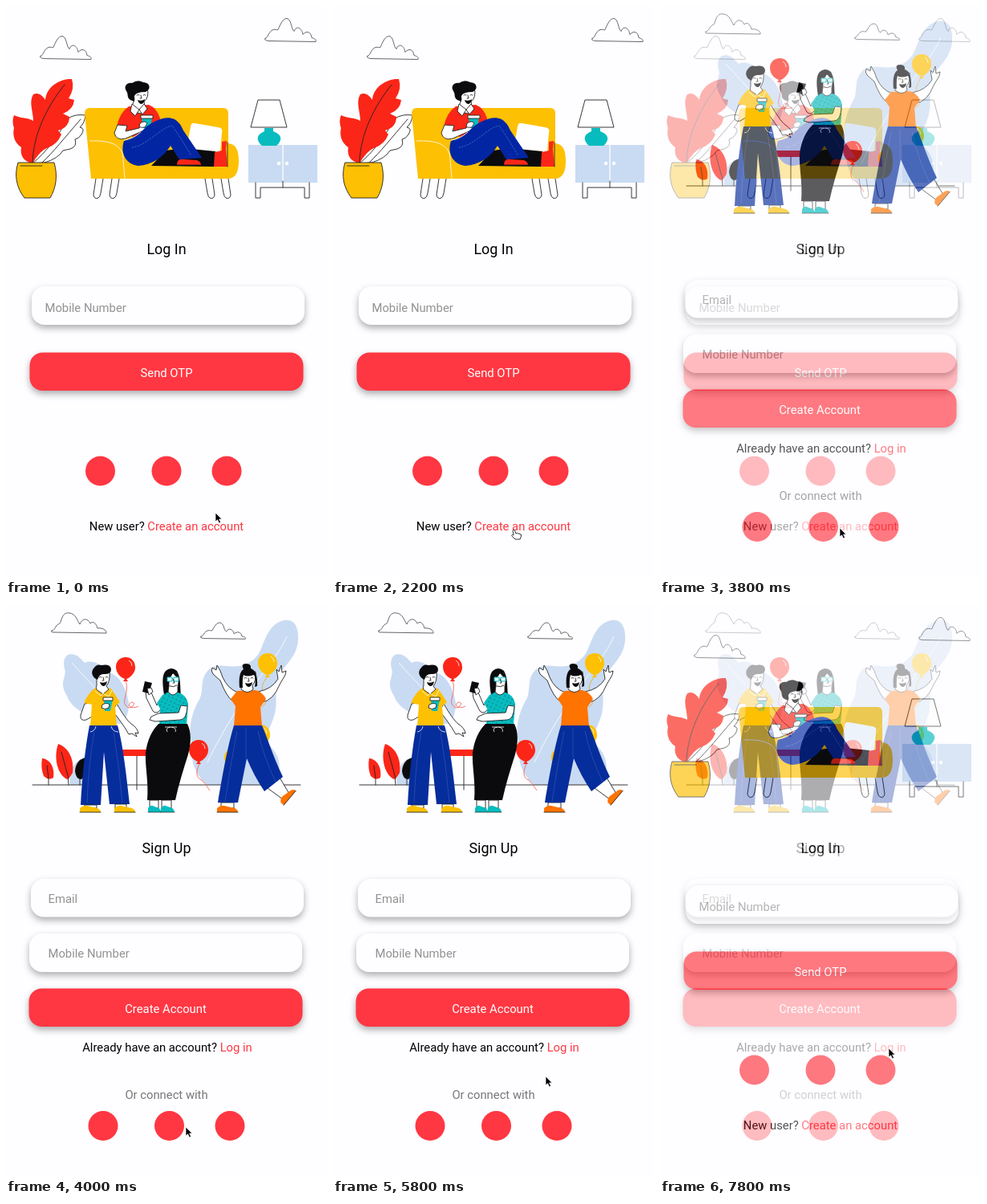
Write an HTML page that moves like this. It is 400 by 711 pixels and loops after 8000 ms.

```html
<!DOCTYPE html>
<html lang="en">
<head>
<meta charset="utf-8">
<title>Log in and sign up</title>
<style>
  html, body { margin: 0; width: 100%; height: 100%; overflow: hidden; background: #fefdff; }
  svg { display: block; width: 100%; height: 100%; }
  text { font: 14.8px Roboto, sans-serif; }
  .title { font-size: 17.9px; }
  .mid { text-anchor: middle; }
  .hint { fill: #929292; }
  .soft { fill: #777; }
  .light { fill: #fff; }
  .red { fill: #ff3742; }
  .field, .button { filter: drop-shadow(0 4px 4px rgba(0, 0, 0, .32)); }
  .field { fill: #fefdff; }
  .button { fill: #ff3742; }
  .line { fill: none; stroke: #222; stroke-width: .9; stroke-linecap: round; stroke-linejoin: round; }
  .skin { fill: #fff; stroke: #222; stroke-width: .9; stroke-linejoin: round; }
  .seam { fill: none; stroke: #fff; stroke-width: .8; }
  .thin { fill: none; stroke: #7a8fdb; stroke-width: .6; stroke-dasharray: 2 1.5; }
  .fold { fill: none; stroke: #3d5cb8; stroke-width: .6; }
  .string { fill: none; stroke: #f4574f; stroke-width: .8; }
  .scarlet { fill: #fb2618; }
  .yellow { fill: #fdc003; }
  .blue { fill: #0226a3; }
  .denim { fill: #062d9c; }
  .sky { fill: #c9dbf2; }
  .teal { fill: #07bcbf; }
  .orange { fill: #ff7300; }
  .black { fill: #0b0b0d; }
</style>
</head>
<body>
<svg viewBox="0 0 400 711" preserveAspectRatio="none">
  <defs>
    <path id="cloud" class="line" style="stroke:#555" vector-effect="non-scaling-stroke"
      d="M1 25C5 24 5 16 11 14C14 13 15 15 17 14C20 7 23 0 28 0C34 1 33 13 37 16C40 8 47 12 48 20C52 15 58 16 59 24C63 25 65 27 64 29L5 28Q-1 27 1 25Z"/>
    <path id="sofaLeg" class="skin" d="M112 215L109 235Q110 241 115 239Q117 238 118 233L121 215"/>
    <g id="balloon">
      <path d="M0-13C8-13 12-7 12 0C12 7 5 13 1 14L3 17H-3L-1 14C-7 12-12 6-12-1C-12-8-7-13 0-13Z"/>
      <path class="seam" d="M4-9Q8-7 8-2"/>
    </g>
    <g id="face">
      <path class="line" d="M-5-2q1.5-1.5 3 0M3-2q1.5-1.5 3 0M0-2l1 4h-2"/>
      <path class="black" d="M-4 4Q1 6 5 3Q4 9 0 9Q-3 8-4 4Z"/>
    </g>
    <g id="shoe">
      <path d="M0 8V3Q4-1 9 0L22 3Q26 5 26 8Z"/>
      <path class="line" d="M0 8H26"/>
    </g>
    <pattern id="dots" width="5" height="5" patternUnits="userSpaceOnUse" patternTransform="rotate(25)">
      <path class="teal" d="M0 0H5V5H0Z"/><circle cx="2" cy="2" r=".7" fill="#075c70"/>
    </pattern>
  </defs>

  <g id="signup">
    <path fill="#fefdff" d="M0 0H400V711H0Z"/>
    <path class="line" style="stroke:#555" d="M57 32C62 31 61 26 65 24C68 23 68 21 69 18C71 12 74 9 79 10C87 11 88 18 92 24C95 16 102 16 105 23C109 19 113 24 114 29C119 28 126 31 125 35L60 34Q55 34 57 32Z"/>
    <use href="#cloud" transform="translate(242 22) scale(.88 .7)"/>

    <path class="sky" d="M77 62C87 59 92 66 98 72C108 67 120 75 128 84C142 88 150 104 153 122Q153 138 145 148C134 147 119 148 106 139C92 133 79 124 76 113Q70 104 71 96Q73 89 74 83Q69 68 77 62Z"/>
    <path class="seam" d="M82 72C99 91 119 111 142 139"/>
    <path class="sky" d="M343 20C358 15 365 26 364 43C363 64 348 74 341 86C333 99 339 118 335 135C331 151 323 157 327 174C342 186 345 205 335 224H250C236 211 229 194 233 177C226 159 230 138 239 121C246 111 243 101 246 91C251 77 262 74 275 76C293 78 303 75 314 62C322 50 324 27 343 20Z"/>
    <path class="seam" d="M350 39C337 71 292 110 251 196"/>
    <path class="sky" d="M101 190C88 189 76 207 80 224H111Z"/>

    <path class="line" d="M33 224H367M53 197V224M70 180Q77 203 78 224M92 194V224"/>
    <path class="scarlet" d="M45 191C56 192 61 204 59 215Q53 219 47 213Q43 203 45 191ZM65 173C79 178 85 193 83 209Q79 216 76 217C64 211 59 190 65 173Z"/>
    <path class="black" d="M99 190Q87 193 86 207Q87 217 94 217L99 212Z"/>
    <path class="line" d="M51 200L53 216M69 183L78 216"/>
    <path class="scarlet" d="M142 180H178V188H142Z"/>
    <path class="line" d="M163 188V230"/>

    <g class="scarlet"><use href="#balloon" x="149" y="78"/><use href="#balloon" x="240" y="181"/></g>
    <path class="string" d="M149 94C154 108 144 119 149 125Q155 132 160 123Q156 118 153 125Q158 130 165 126M241 198C236 208 237 216 244 218Q248 222 254 231"/>
    <g class="yellow"><use href="#balloon" x="326" y="73"/><use href="#balloon" x="317" y="162"/><use href="#balloon" x="284" y="191"/></g>
    <path class="string" style="stroke:#d9aa29" d="M325 90Q315 103 322 111T318 128"/>

    <!-- man with a cup -->
    <path class="skin" d="M138 123C145 135 151 144 156 148Q164 153 165 160L161 159L163 164L157 160L153 161C147 150 139 140 133 132ZM98 123L93 137Q92 145 100 143L119 132L126 128L122 123L109 130L111 121Z"/>
    <path class="yellow" d="M112 103L131 104L142 121L136 126L138 151H105L107 124L97 122Q103 108 112 103Z"/>
    <path class="skin" d="M113 86V100Q111 105 115 107L121 111L128 105L125 101Q130 95 129 84Z"/>
    <path class="black" d="M112 92C106 88 106 82 110 78Q113 73 119 75Q130 73 131 80Q131 86 123 86Q116 85 114 93Z"/>
    <use href="#face" x="121" y="92"/>
    <path class="seam" d="M111 107L118 113L121 110L128 114L132 106"/>
    <path class="teal" d="M122 118H133L130 132H123Z"/>
    <path class="skin" d="M121 115H133V119H121ZM120 124Q126 121 129 124L128 128Q123 131 119 128Z"/>
    <path class="denim" d="M104 150H139C145 171 149 202 154 248H129L122 183L118 249H93C95 211 99 176 104 150Z"/>
    <path class="fold" d="M110 158Q103 195 101 246M134 158Q141 200 145 246"/>
    <path class="seam" d="M105 158Q111 157 112 151M131 151Q133 158 140 158"/>
    <path class="skin" d="M98 249H113V253H98ZM136 248H150V253H136Z"/>
    <g class="yellow"><use href="#shoe" x="92" y="250"/><use href="#shoe" x="135" y="250"/></g>

    <!-- woman with a phone -->
    <path class="black" d="M197 112C195 99 194 87 199 82Q206 76 213 82C219 92 216 105 219 119L195 117Z"/>
    <path class="skin" d="M195 114L188 125L181 109L174 109L175 116L183 132Q187 136 191 132L201 120Z"/>
    <path class="black" d="M173 95L182 97L178 110L170 108Z"/>
    <path class="skin" d="M176 104L181 103L183 108L178 112Z"/>
    <path fill="url(#dots)" d="M195 112L203 108L215 109Q225 112 227 123L225 149H191L192 129L188 122Z"/>
    <path class="skin" d="M218 125L215 134L190 135L181 139L179 143L186 145L217 143Q225 143 226 126ZM203 87V101L202 108Q208 116 214 108V102Q217 90 212 84Z"/>
    <path class="black" d="M199 91C202 80 214 80 215 91Q210 89 208 84Q206 91 201 92Z"/>
    <path fill="#dff6f8" stroke="#07bcbf" d="M201 90H207V95H201ZM209 90H215V95H209Z"/>
    <path class="line" d="M208 92L210 97H208M204 101Q209 103 213 100"/>
    <path class="black" d="M190 148H226C231 158 231 171 227 186C221 205 215 224 211 243H192L197 207L192 243H176C178 220 173 201 174 184C176 168 182 156 190 148Z"/>
    <path class="seam" d="M198 152H213M205 152Q198 153 201 158M206 152Q213 153 211 158"/>
    <path class="skin" d="M179 243H190V253H179ZM194 243H206V253H194Z"/>
    <g class="teal"><use href="#shoe" transform="translate(177 250) scale(.62 1)"/><use href="#shoe" transform="translate(193 250) scale(.65 1)"/></g>

    <!-- woman with raised arms -->
    <path class="skin" d="M283 120Q275 115 267 94L258 86Q255 82 257 78L262 81L263 75L267 82L270 90Q276 104 289 109ZM319 121Q333 119 341 99L348 87L349 82L344 84L343 75L340 83L337 80L339 92Q331 105 314 108Z"/>
    <path class="orange" d="M288 107L310 106Q319 107 324 117L317 127L319 151H284L286 126L280 117Z"/>
    <path class="skin" d="M294 84V98L293 105Q301 112 308 105L307 100Q312 95 311 83Z"/>
    <path class="black" d="M291 103C290 91 291 83 296 80Q292 73 299 73Q306 73 305 79Q314 82 313 101L310 102Q312 92 309 87Q300 90 296 87Q294 94 295 103Z"/>
    <use href="#face" x="302" y="93"/>
    <path class="skin" d="M268 246H284V253H268ZM326 228L341 215L353 235L345 242Z"/>
    <path class="denim" d="M284 150H319C326 166 333 189 345 214L322 232C313 219 306 205 300 191L289 246H264C269 216 276 176 284 150Z"/>
    <path class="fold" d="M288 157Q279 202 273 245M314 157Q321 190 336 220M299 154V190"/>
    <g class="orange"><use href="#shoe" transform="translate(263 250)"/><use href="#shoe" transform="translate(340 244) rotate(-50) scale(.9 1)"/></g>

    <text class="title mid" x="200" y="309">Sign Up</text>
    <rect class="field" x="31" y="341" width="340" height="47.500" rx="16"/>
    <text class="hint" x="52.500" y="371">Email</text>
    <rect class="field" x="29" y="409" width="340" height="48" rx="16"/>
    <text class="hint" x="52.500" y="439">Mobile Number</text>
    <rect class="button" x="28.500" y="477.500" width="341" height="47.500" rx="16"/>
    <text class="light mid" x="199" y="507.500">Create Account</text>
    <text class="mid" x="201" y="556">Already have an account? <tspan class="red">Log in</tspan></text>
    <text class="soft mid" x="200" y="615">Or connect with</text>
    <g class="red"><circle cx="121" cy="648.500" r="18.500"/><circle cx="203.500" cy="648.500" r="18.500"/><circle cx="279" cy="648.500" r="18.500"/></g>
  </g>

  <g id="login">
    <path fill="#fefdff" d="M0 0H400V711H0Z"/>
    <use href="#cloud" x="42" y="37.500"/>
    <use href="#cloud" x="322" y="15.500"/>

    <!-- plant -->
    <path class="skin" d="M33 196C51 181 65 162 77 140Q87 134 99 136Q98 146 92 151Q99 152 94 160Q91 165 86 166Q89 175 80 178L71 180Q65 190 48 195Z"/>
    <path class="line" d="M45 195C59 182 73 164 93 141"/>
    <path class="scarlet" d="M33 196C23 194 17 187 19 176C10 170 8 160 10 152Q7 143 10 136C18 140 28 139 34 143C34 131 28 120 34 110Q42 106 49 117C50 101 67 90 82 91Q86 103 78 115L85 117Q84 129 71 134L79 138Q79 151 65 155L69 160Q64 172 53 176Q42 180 33 196Z"/>
    <path class="line" d="M33 195C34 160 51 125 73 98"/>
    <path class="yellow" stroke="#222" stroke-width=".9" d="M15 195H60C65 212 62 227 55 239H23C13 226 10 211 15 195Z"/>
    <path class="line" d="M18 199H45"/>

    <!-- sofa -->
    <use href="#sofaLeg"/><use href="#sofaLeg" x="20"/>
    <g transform="matrix(-1 0 0 1 389 0)"><use href="#sofaLeg"/><use href="#sofaLeg" x="20"/></g>
    <path class="yellow" d="M104 127H271Q277 127 277 134V171C287 172 290 180 290 193C290 207 286 215 276 215H106L98 134Q98 127 104 127Z"/>
    <path class="seam" d="M104 168C131 167 146 173 146 191L148 215"/>
    <path fill="#fff" d="M235 146L264 151Q271 152 269 158L267 182L225 178L230 150Q231 145 235 146Z"/>

    <!-- reader on the sofa -->
    <path class="black" d="M181 199L199 180L221 177L261 181V200Z"/>
    <path class="scarlet" d="M260 182L269 180V169L275 168L274 178L276 200H259Z"/>
    <path class="scarlet" d="M153 125L178 123Q188 127 192 140L187 150L158 163L147 151L138 150Q142 132 153 125Z"/>
    <path class="skin" d="M139 148L135 158Q137 168 149 165L174 154L182 150L177 143L170 145L166 152L149 156L151 149Z"/>
    <path class="skin" d="M158 104L160 116L157 125Q160 133 168 134L173 125L172 119Q179 114 176 101Z"/>
    <path class="black" d="M155 117C150 114 153 110 150 106C146 100 151 95 157 96Q164 91 171 95C180 95 181 104 174 107Q162 107 160 112L160 119Z"/>
    <use href="#face" x="168" y="113"/>
    <path class="skin" d="M157 122L155 131L161 137L166 129L170 135L176 128L172 122L166 129Z"/>
    <path class="teal" d="M169 139H182L180 152H171Z"/>
    <path class="skin" d="M168 136H183V140H168ZM167 146Q173 142 176 146L173 151Q168 152 166 150Z"/>
    <path class="blue" d="M147 168Q164 163 174 151C186 142 199 136 210 141Q217 145 221 155L244 189L216 191L205 174C196 189 181 198 165 199C149 197 142 183 147 168Z"/>
    <path class="thin" d="M157 176C176 174 193 151 207 149Q215 160 230 185"/>
    <path class="seam" d="M147 167Q158 166 168 157"/>
    <path class="scarlet" d="M213 198Q213 189 222 191L238 192Q243 194 243 198Z"/>
    <path class="line" d="M213 198H243M276 170V200"/>

    <!-- lamp and cabinet -->
    <path class="sky" d="M302 173H388V220H302Z"/>
    <path class="seam" d="M345 173V219" style="stroke-width:1.3"/>
    <circle class="light" cx="340" cy="196" r="2.200"/><circle class="light" cx="350" cy="196" r="2.200"/>
    <path class="line" d="M311 220V239H317V226H372V239H378V220M345 218V226"/>
    <path class="teal" d="M322 152H333V156C344 160 345 167 337 174H319C311 167 312 160 322 156Z"/>
    <path class="skin" d="M314 117H341L350 151H305Z"/>

    <text class="title mid" x="200" y="309">Log In</text>
    <rect class="field" x="32" y="349" width="340" height="48" rx="16"/>
    <text class="hint" x="48.500" y="381">Mobile Number</text>
    <rect class="button" x="29.500" y="431.500" width="341" height="47.500" rx="16"/>
    <text class="light mid" x="200" y="461.500">Send OTP</text>
    <g class="red"><circle cx="117.500" cy="579" r="18.500"/><circle cx="200" cy="579" r="18.500"/><circle cx="275" cy="579" r="18.500"/></g>
    <text class="mid" x="200" y="653">New user? <tspan class="red">Create an account</tspan></text>
  </g>

  <g id="cursor">
    <path id="arrow" fill="#000" stroke="#fff" stroke-width=".7" d="M0 0V11L2.600 8.800L4.500 13L6.500 12L4.600 8H8Z"/>
    <path id="hand" class="skin" d="M0 2Q1 0 2.500 2L4 6Q6 4.500 7 6Q8.500 5 9 7Q11 6 10.500 9L9 13H3L-1.500 8.500Q-1 6.500 1 8Z"/>
  </g>
</svg>
<script>
  const LOOP = 8000, STEP = 200, FADE = 300;
  const [login, cursor, arrow, hand] =
    ['login', 'cursor', 'arrow', 'hand'].map(id => document.getElementById(id));

  // time, x, y of the pointer
  const route = [
    [0, 261, 631], [400, 267, 628], [1400, 267, 628], [1600, 258, 624], [1800, 258, 624],
    [2200, 224, 651], [3400, 224, 651], [3600, 224, 650], [4000, 224, 650],
    [4600, 256, 606], [5400, 265, 587], [6000, 265, 587], [6800, 285, 552], [8000, 285, 552]
  ];
  const clamp = v => Math.max(0, Math.min(1, v));
  const within = (t, from, to) => t >= from && t < to;

  function pointerAt(t) {
    const i = route.findIndex(p => p[0] > t);
    const [t0, x0, y0] = route[i - 1], [t1, x1, y1] = route[i];
    const k = (t - t0) / (t1 - t0);
    return [x0 + (x1 - x0) * k, y0 + (y1 - y0) * k];
  }

  function draw(now) {
    const t = Math.floor(now % LOOP / STEP) * STEP;
    login.setAttribute('opacity', 1 - clamp((t - 3600) / FADE) + clamp((t - 7600) / FADE));
    cursor.setAttribute('transform', `translate(${pointerAt(t)})`);
    const hovering = within(t, 2200, 3600) || within(t, 6800, 7600);
    hand.style.display = hovering ? '' : 'none';
    arrow.style.display = hovering ? 'none' : '';
    requestAnimationFrame(draw);
  }
  draw(performance.now());
</script>
</body>
</html>
```
